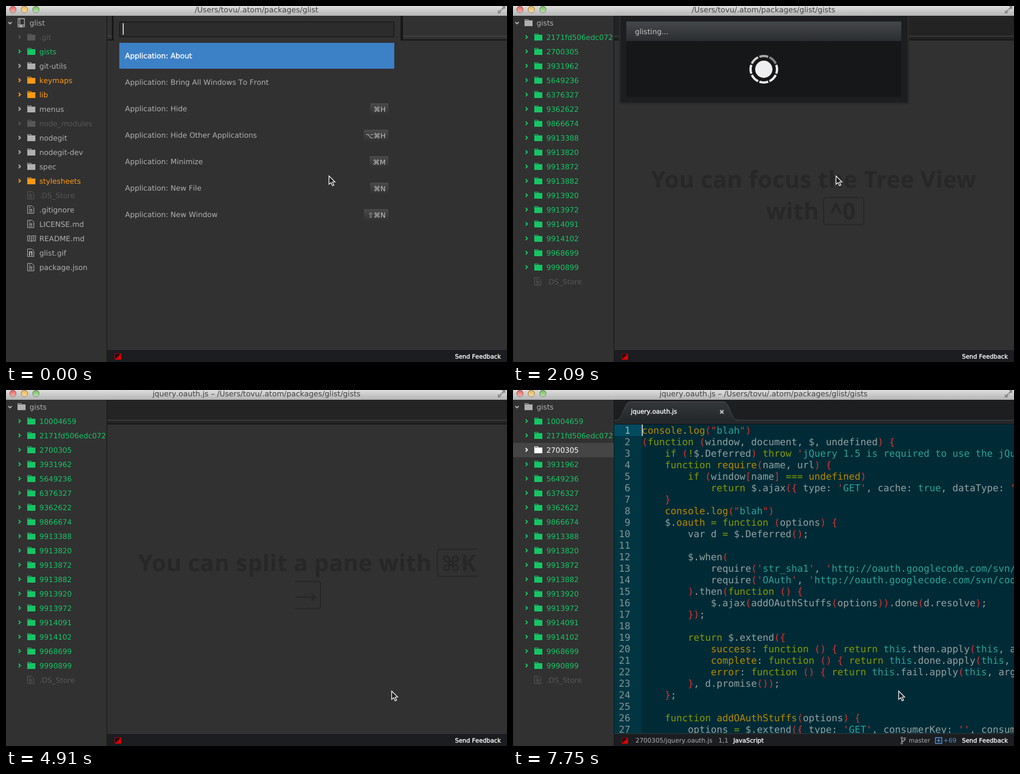
These frames come from a looping animation (871 by 619 pixels, 8 s). An HTML page:

```html
<!DOCTYPE html>
<html lang="en">
<head>
<meta charset="utf-8">
<title>Editor session</title>
<style>
  html, body { margin: 0; width: 100%; height: 100%; overflow: hidden; background: #313131; }
  svg { display: block; width: 871px; height: 619px; color: #272727; font-family: "DejaVu Sans", sans-serif; font-kerning: none; text-rendering: geometricPrecision; }
  text { white-space: pre; }
  .mono { font-family: "DejaVu Sans Mono", monospace; font-size: 16.61px; }
  .tip { font: bold 40px "Open Sans", "Noto Sans", sans-serif; letter-spacing: .5px; fill: currentColor; }
</style>
</head>
<body>
<svg viewBox="0 0 871 619">
  <defs>
    <linearGradient id="title" x2="0" y2="1"><stop stop-color="#dedede"/><stop offset="1" stop-color="#b4b4b4"/></linearGradient>
    <linearGradient id="titleIdle" x2="0" y2="1"><stop stop-color="#f2f2f2"/><stop offset="1" stop-color="#dcdcdc"/></linearGradient>
    <linearGradient id="head" x2="0" y2="1"><stop stop-color="#45484b"/><stop offset="1" stop-color="#2b2d30"/></linearGradient>
    <linearGradient id="key" x2="0" y2="1"><stop stop-color="#4a4a4a"/><stop offset="1" stop-color="#313131"/></linearGradient>
    <linearGradient id="tab" x2="0" y2="1"><stop stop-color="#34373a"/><stop offset="1" stop-color="#25282b"/></linearGradient>
    <linearGradient id="light" x2="0" y2="1"><stop stop-color="#fff" stop-opacity=".05"/><stop offset="1" stop-color="#fff" stop-opacity=".55"/></linearGradient>
    <clipPath id="side"><path d="M0 17H175V619H0z"/></clipPath>
    <clipPath id="patch"><path d="M177 30H695V395H177z"/></clipPath>
    <clipPath id="code"><path d="M176 60H871V597H176z"/></clipPath>
  </defs>
  <g id="scene"></g>
  <g id="ring"></g>
  <path id="caret" fill="#fff"/>
  <path id="mouse" d="M.5 .5V15L4 12L6.5 17.5L9 16.4L6.6 11H11z" fill="#1c1c1c" stroke="#fff" stroke-width="1.2"/>
</svg>
<script>
const LOOP = 8000;
const GREEN = '#16c565', ORANGE = '#ff9814', GREY = '#b0b0b0', DIM = '#575757', WHITE = '#fff';
const $ = id => document.getElementById(id);
const esc = s => s.replace(/&/g, '&amp;').replace(/</g, '&lt;');
const rect = (x, y, w, h, fill, more = '') =>
  `<rect x="${x}" y="${y}" width="${w}" height="${h}" fill="${fill}" ${more}/>`;
const path = (d, fill, more = '') => `<path d="${d}" fill="${fill}" ${more}/>`;
const line = (d, color, width = 1) => path(d, 'none', `stroke="${color}" stroke-width="${width}"`);
const text = (x, y, s, fill = GREY, size = 12.67, more = '') =>
  `<text x="${x}" y="${y}" fill="${fill}" font-size="${size}" ${more}>${esc(s)}</text>`;
const strong = (x, y, s, size) => text(x, y, s, WHITE, size, 'stroke="#fff" stroke-width=".35"');

// Window frame

function titleBar(title, active) {
  const lights = ['#e9574f', '#f2b13c', '#69bd4c'].map((c, i) => {
    const spot = (fill, stroke) => `<circle cx="${12 + 20 * i}" cy="6" r="5.6" fill="${fill}" stroke="${stroke}"/>`;
    return active ? spot(c, '#00000070') + spot('url(#light)', 'none') : spot('#efefef', '#9b9b9b');
  }).join('');
  const ink = active ? '#8a8a8a' : '#aaa';
  return rect(0, 0, 871, 17, active ? 'url(#title)' : 'url(#titleIdle)') + lights +
    text(435.5, 10.5, title, active ? '#404040' : '#7c7c7c', 13.03, 'text-anchor="middle"') +
    path('M862 0H868V6L866 4L863 7L861 5L864 2zM855 13V7L857 9L860 6L862 8L859 11L861 13z', ink);
}

function statusBar(open) {
  let s = rect(176, 597, 695, 22, '#1b1d20') + rect(176, 597, 695, 1, '#34373c') +
    rect(189.5, 604.5, 10, 10, '#171010', 'stroke="#b80000"') + path('M200 604V615H189z', '#dc0000') +
    strong(780.5, 613, 'Send Feedback', 10.45);
  if (open) {
    s += text(213, 613, '2700305/jquery.oauth.js', GREY, 10.9) + text(357, 613, '1,1', GREY, 10.9) +
      strong(383, 613, 'JavaScript', 10.57) + text(688, 613, 'master', GREY, 10.5) +
      line('M676 606V613M681 607V608Q681 610 676.5 611', GREY, 1.4) +
      [[676, 605], [676, 614], [681, 606]].map(([x, y]) =>
        `<circle cx="${x}" cy="${y}" r="1.6" fill="#1b1d20" stroke="${GREY}"/>`).join('') +
      line('M735 604.5H745.5V614.5H734.5V604.5zM740 606.5V612.5M737 609.5H743', '#5293d8', 1.5) +
      text(748, 613, '+69', '#5293d8', 10.9);
  }
  return s;
}

// Tree view

const icons = {
  folder: c => path('M0 -6H7V-4H14V6H0zM1 -5V-4H6V-5z', c, 'fill-rule="evenodd"'),
  file: c => line('M.5 -6.5H8L11.5 -3V6.5H.5zM3 -3.5H6M3 -.5H9M3 1.5H9M3 4H9', c),
  book: c => line('M.5 -4.5H6L7.5 -3.5L9 -4.5H14.5V4.5H9L7.5 5.5L6 4.5H.5zM7.5 -3.5V5M2.5 -2H5.5M2.5 0H5.5M2.5 2H5.5M9.5 -2H12.5M9.5 0H12.5M9.5 2H12.5', c),
  image: c => line('M.5 -6.5H8L11.5 -3V6.5H.5z', c) + line('M4 5V-1.5H8V5', c, 2),
  repo: c => line('M1 -7H12V4H1zM4 -7V4M1 4V7H4M8 7H12V4', c, 1.3) + path('M4 4H8V9L6 7.5L4 9z', c)
};
const icon = (name, x, y, color) => `<g transform="translate(${x} ${y})">${icons[name](color)}</g>`;

const project = [
  ['.git', DIM], ['gists', GREEN], ['git-utils', GREY], ['keymaps', ORANGE], ['lib', ORANGE], ['menus', GREY],
  ['node_modules', DIM], ['nodegit', GREY], ['nodegit-dev', GREY], ['spec', GREY], ['stylesheets', ORANGE],
  ['.DS_Store', DIM, 'file'], ['.gitignore', GREY, 'file'], ['LICENSE.md', GREY, 'file'],
  ['README.md', GREY, 'book'], ['glist.gif', GREY, 'image'], ['package.json', GREY, 'file']
];
const ids = ('2171fd506edc072 2700305 3931962 5649236 6376327 9362622 9866674 9913388 9913820 9913872 ' +
  '9913882 9913920 9913972 9914091 9914102 9968699 9990899').split(' ');
const gists = list => [...list.map(id => [id, GREEN]), ['.DS_Store', DIM, 'file']];

function tree(root, rows, bg, selected) {
  let s = rect(0, 17, 175, 602, bg) + line('M4 28L7 31L10 28', GREY, 1.8) +
    icon(root === 'glist' ? 'repo' : 'folder', 20, 29, GREY) + text(41, 34, root);
  rows.forEach(([name, color, kind = 'folder'], i) => {
    const y = 54 + 25 * i;
    if (name === selected) {
      s += rect(0, y - 12, 175, 25, '#454545');
      color = WHITE;
    }
    if (kind === 'folder') s += line(`M22 ${y - 3}L25 ${y}L22 ${y + 3}`, color, 1.8);
    s += icon(kind, 37, y, color) + text(58, y + 5, name, color);
  });
  return `<g clip-path="url(#side)">${s}</g>` + rect(175, 17, 1, 602, '#161616');
}

// Empty pane, its tips and the modal panels

const emptyPane = (bg, bar) => rect(176, 17, 695, 580, bg) + rect(176, 17, 695, 42, bar) +
  rect(176, 52, 695, 1, '#4b4b4b') + rect(176, 58, 695, 2, '#161616');

const tipText = (x, y, s) => `<text class="tip" x="${x}" y="${y}">${s}</text>`;
const focusTip = tipText(240, 316, 'You can focus the Tree View') + tipText(440, 371, 'with') +
  tipText(551, 371, '^0') + rect(540, 333, 70, 47, 'none', 'rx="4" stroke="currentColor" stroke-width="2"');
const splitTip = tipText(230, 315, 'You can split a pane with') +
  text(757, 315, '⌘', 'currentColor', 36, 'font-weight="bold"') + tipText(791, 315, 'K') +
  line('M820 277H754Q750 277 750 281V320Q750 324 754 324H820M502 333H543Q547 333 547 337V376Q547 380 543 380H502', 'currentColor', 2) +
  line('M503 360H538M531 353.5L538 360L531 366.5', 'currentColor', 2.4);

function badge(keys, y, width, fill, ink) {
  return rect(665 - width, y - 10, width, 21, fill, 'rx="2"') +
    text(660, y + 4.5, keys, ink, 12, 'text-anchor="end"');
}

const commands = [
  ['About'], ['Bring All Windows To Front'], ['Hide', '⌘H', 32], ['Hide Other Applications', '⌥⌘H', 43],
  ['Minimize', '⌘M', 33], ['New File', '⌘N', 32], ['New Window', '⇧⌘N', 43]
].map(([name, ...rest]) => ['Application: ' + name, ...rest]);
const matches = [
  ['Glist: Toggle', '^C ^G', 51], ['Fuzzy Finder: Toggle Git Status Finder', '⇧⌘B', 42], commands[1]
];

function palette(typed, list, framed) {
  let s = rect(197.5, 27.5, 477, 26, '#2c2c2d', 'stroke="#111"') +
    `<text class="mono" x="203" y="46" fill="#fff">${typed}</text>`;
  list.forEach(([name, keys, width], i) => {
    const y = 86 + 46 * i;
    if (!i) s += rect(197, 64, 478, 45, '#3c80c6');
    else if (framed) s += rect(197, y - 22, 478, 45, '#27282b');
    s += i ? text(207, y + 5, name) : strong(207, y + 5, name, 12.67);
    if (keys) s += badge(keys, y + 1, width, i ? 'url(#key)' : '#466d9a', i ? '#c4c4c4' : WHITE);
  });
  return s;
}

const panel = bottom => rect(184, 17, 505, bottom - 14, '#292a2b', 'rx="4"') +
  rect(187, 17, 499, bottom - 17, '#1d1e20', 'rx="2"');
const loading = panel(168) + rect(197, 27, 478, 34, 'url(#head)') + rect(197, 61, 478, 97, '#161719') +
  text(212, 49, 'glisting...', '#c2c2c2') + '<circle cx="436" cy="110" r="15" fill="#eee"/>';

// Source file

const source = `console.log("blah")
(function (window, document, $, undefined) {
    if (!$.Deferred) throw 'jQuery 1.5 is required to use the jQuery
    function require(name, url) {
        if (window[name] === undefined)
            return $.ajax({ type: 'GET', cache: true, dataType: 'script'
    }
    console.log("blah")
    $.oauth = function (options) {
        var d = $.Deferred();

        $.when(
            require('str_sha1', 'http://oauth.googlecode.com/svn/code
            require('OAuth', 'http://oauth.googlecode.com/svn/code
        ).then(function () {
            $.ajax(addOAuthStuffs(options)).done(d.resolve);
        });

        return $.extend({
            success: function () { return this.then.apply(this, arguments
            complete: function () { return this.done.apply(this, arguments
            error: function () { return this.fail.apply(this, arguments
        }, d.promise());
    };

    function addOAuthStuffs(options) {
        options = $.extend({ type: 'GET', consumerKey: '', consumerSecret`.split('\n');

const RED = '#dc322f', CYAN = '#2aa198', OLIVE = '#859900', GOLD = '#b58900';
const span = (color, s) => `<tspan fill="${color}">${esc(s)}</tspan>`;
const token = /(['"])(.*?)(\1|$)|([()[\]{}]+)|(\b(?:function|if|throw|return)\b|[=!]+)|(\b(?:this|true)\b)|(console|\blog\b|(?<=function )\w+|(?<=\$\.)oauth|(?<== )undefined|(?:success|complete|error)(?=:))/g;
const paint = s => s.replace(token, (m, quote, str, end, brace, word, value) =>
  quote ? span(RED, quote) + span(CYAN, str) + span(RED, end)
    : span(brace ? RED : word ? OLIVE : value ? CYAN : GOLD, m));

function editor() {
  const rows = source.map((s, i) => {
    const y = 76 + 20 * i;
    return `<text class="mono" x="204" y="${y}" text-anchor="end" fill="${i ? '#839496' : '#a5b3b4'}">${i + 1}</text>` +
      `<text class="mono" x="224" y="${y}" fill="#93a1a1">${paint(s)}</text>`;
  }).join('');
  return rect(176, 17, 695, 43, '#1c1e20') + rect(176, 52, 695, 1, '#44474a') + rect(176, 53, 695, 6, '#25282b') +
    path('M176 53C188 53 187 47 193 34C198 22 199 20 208 20H362C371 20 372 23 377 34C382 46 382 53 393 53z', 'url(#tab)') +
    line('M176 52.5C188 53 187 47 193 34C198 22 199 20.5 208 20.5H362C371 20.5 372 23 377 34C382 46 382 52.5 393 52.5', '#4a4d50') +
    rect(180, 52, 208, 2, '#25282b') + strong(205, 41, 'jquery.oauth.js', 10.7) +
    line('M360 35L366 41M366 35L360 41', '#c8c8c8', 1.8) + rect(176, 59, 695, 1, '#101214') +
    `<g clip-path="url(#code)">${rect(176, 60, 695, 537, '#002b36')}${rect(176, 60, 48, 537, '#003541')}` +
    `${rect(176, 60, 48, 20, '#004b60')}${rows}</g>`;
}

// Scenes by start time

const home = '/Users/tovu/.atom/packages/glist';
const fileTitle = 'jquery.oauth.js – ' + home + '/gists';
const shell = (title, side, pane, active = true, open = false) =>
  pane + side + titleBar(title, active) + statusBar(open);

const bars = rect(184, 17, 3, 42, '#161616') + rect(686, 17, 4, 42, '#161616');
const startPane = emptyPane('#313131', '#313131') + bars + rect(188, 18, 498, 45, '#313131');
const patch = `<g clip-path="url(#patch)" color="#2f2f2f">${rect(177, 30, 518, 365, '#393939')}` +
  `${rect(177, 30, 518, 29, '#262626')}${rect(177, 52, 518, 1, '#4b4b4b')}${rect(177, 58, 518, 2, '#161616')}${focusTip}</g>`;
const projectTree = tree('glist', project, '#313131');
const finder = (typed, list) =>
  shell(home, projectTree, startPane + patch + panel(list.length > 3 ? 396 : 212) + palette(typed, list, true));
const oldTree = bg => tree('gists', gists(ids), bg);
const newTree = selected => tree('gists', gists(['10004659', ...ids]), '#313131', selected);
const waiting = (bg, tip, active) =>
  shell(home + '/gists', oldTree(bg), emptyPane(bg, '#232323') + tip + loading, active);

const scenes = [
  [0, shell(home, projectTree, startPane + palette('', commands, false))],
  [150, finder('g', commands)],
  [300, finder('gl', matches)],
  [450, finder('gli', matches)],
  [590, finder('glis', matches)],
  [740, finder('glist', matches)],
  [1940, waiting('#313131', focusTip, true)],
  [4320, waiting('#393939', '', false) + rect(-4, 613, 140, 8, '#1f1f1f', 'rx="3"')],
  [4610, waiting('#313131', '', true)],
  [4910, shell(fileTitle, newTree(), emptyPane('#313131', '#242424') + splitTip)],
  [5060, shell(fileTitle, newTree('2700305'), editor(), true, true)]
];

// Eight ring segments; the dim tail turns one segment per step.
function ring(t) {
  if (t < 1940 || t >= 4910) return '';
  const step = Math.min(17, Math.floor((t - 1930) / 149));
  const shades = ['#858585', '#a6a6a6', '#cfcfcf'];
  let s = '';
  for (let i = 0; i < 8; i++) {
    const mid = (i * 45 - 90) * Math.PI / 180;
    const at = a => `${436 + 23 * Math.cos(a)} ${110 + 23 * Math.sin(a)}`;
    s += line(`M${at(mid - .34)}A23 23 0 0 1 ${at(mid + .34)}`, shades[(step - i + 8) % 8] || '#eee', 4);
  }
  return s;
}

const blinks = [5360, 5810, 6260, 6550, 7000, 7450, 7750];
function caret(t) {
  if (t < 1940) {
    const typed = scenes.filter(([start]) => start && start <= t).length;
    return t >= 1040 && t < 1490 ? '' : `M${203 + 10 * typed} 30h1.4v20h-1.4z`;
  }
  return blinks.filter(b => b <= t).length % 2 ? 'M224 60h1.4v20h-1.4z' : '';
}

function mouse(t) {
  if (t >= 4320 && t < 4610) return [-50, -50];
  if (t >= 4610) return [670, 523];
  const held = 3130 + Math.floor((t - 3130) / 149) * 149;
  const p = Math.min(1, Math.max(0, (held - 2981) / 745));
  const e = p * p * (3 - 2 * p);
  return [561 + 177 * e, 295 + 283 * e];
}

let shown = -1;
function draw(t) {
  const now = scenes.filter(([start]) => start <= t).length - 1;
  if (now !== shown) {
    $('scene').innerHTML = scenes[now][1];
    shown = now;
  }
  $('ring').innerHTML = ring(t);
  $('caret').setAttribute('d', caret(t));
  $('mouse').setAttribute('transform', `translate(${mouse(t)})`);
}

const begin = performance.now();
function tick() {
  draw((performance.now() - begin) % LOOP);
  requestAnimationFrame(tick);
}
tick();
</script>
</body>
</html>
```
